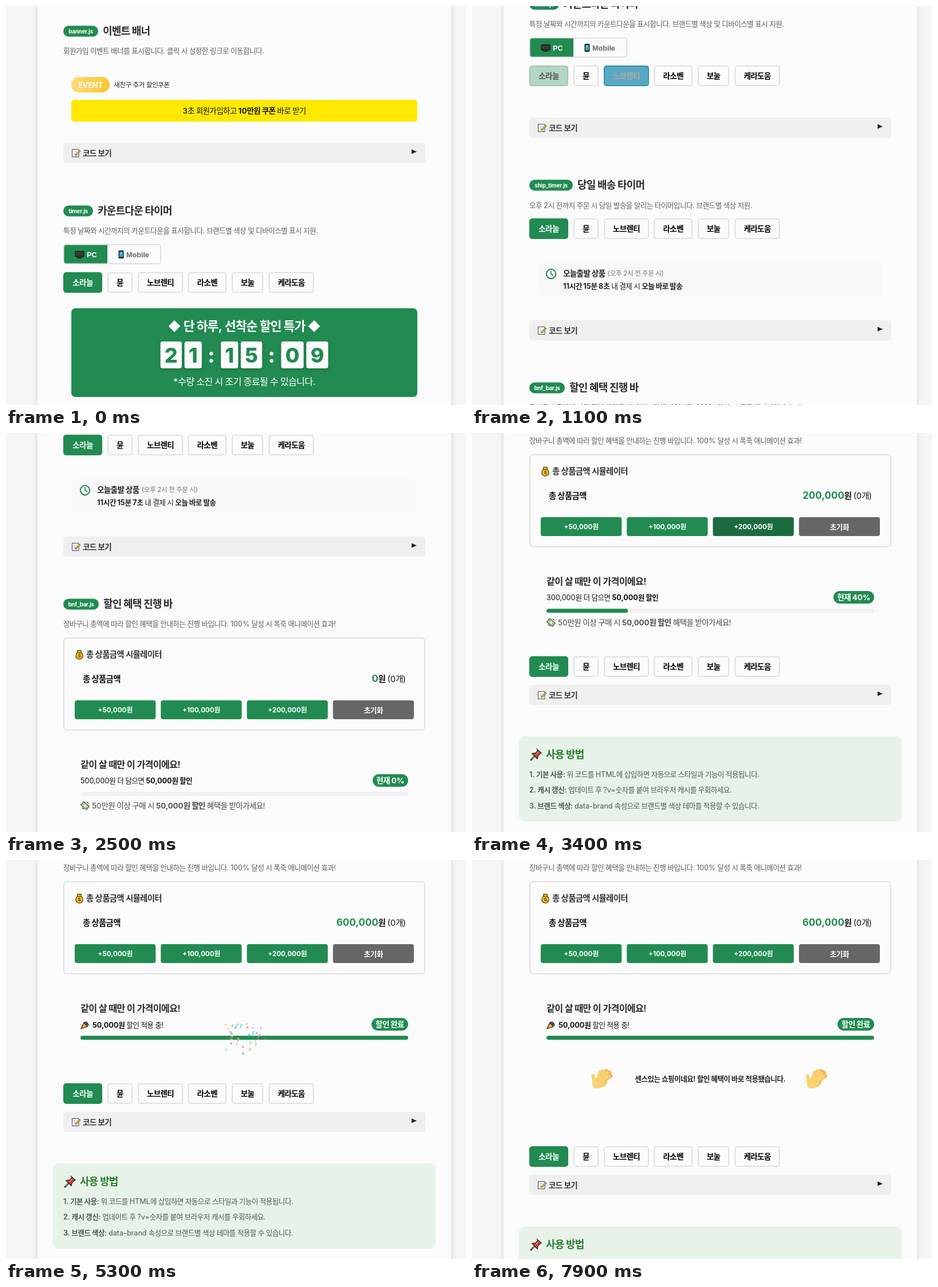
Animation, 803 px wide and 697 px high, one loop 8.1 s. Source, as an HTML page with a canvas:

```html
<!DOCTYPE html>
<html lang="ko">
<head>
<meta charset="utf-8">
<title>위젯 미리보기</title>
<style>
html, body { margin: 0; width: 100%; height: 100%; overflow: hidden; background: #f6f5f5; }
canvas { display: block; }
</style>
</head>
<body>
<canvas id="stage" width="803" height="697"></canvas>
<script>
const ctx = document.getElementById('stage').getContext('2d');
const LOOP = 8100, STEP = 100;
const FONT = 'Inter, "Noto Sans CJK KR", "Noto Sans CJK", sans-serif';
const GREEN = [33, 139, 81], BLUE = [10, 127, 167], PALE = [251, 251, 251];
const LINE = [221, 221, 221], HOVER = [110, 175, 145], BLACK = [0, 0, 0], WHITE = [255, 255, 255];
const BRANDS = [['소라늘', 100, 68], ['뮨', 177, 44], ['노브렌티', 230, 79],
  ['라소벤', 317.5, 67.5], ['보눌', 394, 55], ['케라도움', 458.5, 79]];
const TIMER_H = 155, NOTICE_H = 110, NOTICE_AT = 5500;
const SCROLL = [[200, 0], [300, 120], [400, 290], [500, 361], [2300, 361],
  [2400, 690], [2500, 884], [2700, 884], [2800, 1004], [2900, 1204]];

const rgb = c => `rgb(${c.map(Math.round)})`;
const green = rgb(GREEN);
const clamp = v => Math.min(1, Math.max(0, v));
const mix = (a, b, p) => rgb(a.map((v, i) => v + (b[i] - v) * p));
const between = (t, a, b) => t >= a && t < b;

function track(keys, t) {
  if (t <= keys[0][0]) return keys[0][1];
  for (let i = 1; i < keys.length; i++) {
    const [t0, v0] = keys[i - 1], [t1, v1] = keys[i];
    if (t <= t1) return v0 + (v1 - v0) * (t - t0) / (t1 - t0);
  }
  return keys[keys.length - 1][1];
}

function seeded(seed) {
  return () => (seed = (seed * 16807) % 2147483647) / 2147483647;
}

// ---- drawing helpers ----

function box(x, y, w, h, r, fill, border) {
  ctx.beginPath();
  ctx.roundRect(x, y, w, h, r);
  ctx.fillStyle = border || fill;
  ctx.fill();
  if (!border) return;
  const edge = 1.8;
  ctx.beginPath();
  ctx.roundRect(x + edge, y + edge, w - 2 * edge, h - 2 * edge, Math.max(0, r - edge));
  ctx.fillStyle = fill;
  ctx.fill();
}

function disc(x, y, r, fill) {
  ctx.beginPath();
  ctx.arc(x, y, r, 0, 7);
  ctx.fillStyle = fill;
  ctx.fill();
}

function poly(points, fill, stroke, width = 1) {
  ctx.beginPath();
  points.forEach(([x, y]) => ctx.lineTo(x, y));
  ctx.closePath();
  if (fill) { ctx.fillStyle = fill; ctx.fill(); }
  if (stroke) { ctx.strokeStyle = stroke; ctx.lineWidth = width; ctx.stroke(); }
}

function stroke(x1, y1, x2, y2, color, width) {
  ctx.beginPath();
  ctx.moveTo(x1, y1);
  ctx.lineTo(x2, y2);
  ctx.strokeStyle = color;
  ctx.lineWidth = width;
  ctx.lineCap = 'round';
  ctx.stroke();
}

function at(x, y, draw, turn = 0) {
  ctx.save();
  ctx.translate(x, y);
  ctx.rotate(turn);
  draw();
  ctx.restore();
}

function setFont(weight, size, spacing, family = FONT) {
  ctx.font = `${weight} ${size}px ${family}`;
  ctx.letterSpacing = spacing + 'px';
}

// parts: [string, weight, color, size]; y is the visual middle
function rich(x, y, size, parts, align = 0, latin = 0) {
  const tokens = [];
  let width = 0;
  for (const [str, weight, color, own = size] of parts) {
    for (const s of str.match(/[가-힣 ]+|[^가-힣 ]+/g)) {
      const gap = /[가-힣 ]/.test(s[0]) ? -0.045 * own : latin;
      setFont(weight, own, gap);
      const w = ctx.measureText(s).width;
      tokens.push({ s, weight, color, own, gap, w });
      width += w;
    }
  }
  x -= width * align;
  for (const k of tokens) {
    setFont(k.weight, k.own, k.gap);
    ctx.fillStyle = k.color;
    ctx.fillText(k.s, x, y + size * 0.36);
    x += k.w;
  }
  return width;
}

const text = (str, x, y, size, weight, color, align) =>
  rich(x, y, size, [[str, weight, color]], align);

// ---- small icons ----

const icon = {
  memo() {
    box(-7, -7, 12.5, 14, 1, '#444');
    box(-6, -6, 10.5, 12, 0.5, '#fff');
    for (let y = -3; y < 5; y += 3) stroke(-4, y, 2, y, '#bbb', 1);
    stroke(0, 3, 6.5, -3.5, '#444', 3);
    stroke(0.5, 2.5, 6.2, -3.2, '#f2b33d', 1.8);
  },
  monitor() {
    box(-8, -6, 16, 10.5, 1.5, '#1b1b1b');
    box(-6.5, -4.5, 13, 7, 0.5, '#3a3a3a');
    box(-4, 5, 8, 1.8, 0.5, '#1b1b1b');
  },
  phone() {
    box(-4.5, -7, 9, 14, 1.5, '#222');
    box(-3, -5, 6, 9.5, 0.5, '#2fa4dc');
    box(-1.5, -3, 3, 2, 0, '#8bd3f2');
  },
  bag() {
    disc(0, 2, 6.8, '#3a2a08');
    box(-4, -8, 8, 6, 2, '#3a2a08');
    disc(0, 2, 5.7, '#f5bd1f');
    box(-3, -7, 6, 4, 1.5, '#f5bd1f');
    stroke(-3, -3.5, 3, -3.5, '#7b4d12', 1.4);
    text('$', 0, 2.3, 8, 700, '#6b4a08', 0.5);
  },
  bill() {
    at(0, 0, () => {
      box(-7, -4.5, 14, 9, 1, '#333');
      box(-6, -3.5, 12, 7, 0.5, '#a9c98a');
      disc(0, 0, 2.2, '#eef4dc');
    }, 0.7);
    stroke(-5, 4, -2, 6, '#333', 1.2);
    stroke(3, -6, 6, -4, '#333', 1.2);
  },
  popper() {
    poly([[-7, 6.5], [-2, -4], [4, 3]], '#f6b93b', '#222', 1.3);
    poly([[-2, -5], [3, -6], [7, 0], [4, 3]], '#333');
    stroke(1, -3, 3, -5, '#e8553f', 1.6);
    stroke(4, 0, 6.5, 1.5, '#4a9ee0', 1.6);
    stroke(-5, 4, -2, 5, '#d9772c', 1.2);
  },
  pin() {
    stroke(-2, 2, -9, 9, '#222', 2.6);
    stroke(-3, 3, -8, 8, '#ddd', 1);
    poly([[-7, -2], [-1, -3], [3, -7], [2, -9], [9, -3], [7, -2], [3, 2], [2, 7]], '#e5402b', '#222', 1.4);
    stroke(0, -1, 3, -5, '#f58a73', 1.4);
  },
  clap() {
    const hand = (dx, dy, tone, edge) => at(dx, dy, () => {
      for (const [x, y] of [[0, -12], [6, -13], [11, -10.5], [13, -5]]) {
        stroke(-3, 5, x, y, edge, 7.6);
        stroke(-3, 5, x, y, tone, 6.4);
      }
      ctx.beginPath();
      ctx.ellipse(-3, 5, 12, 9.5, -0.8, 0, 7);
      ctx.fillStyle = tone;
      ctx.fill();
    });
    hand(2.5, 0, '#f2bd58', '#e8ac45');
    hand(-2, 1.5, '#fad272', '#efbd5c');
    stroke(-13, 5, -14.5, -5, '#fad272', 6);
  }
};

function heading(y, file, width, title) {
  box(100, y - 9.5, width, 19, 9.5, green);
  rich(100 + width / 2, y, 9.9, [[file, 700, '#fff']], 0.5, -0.3);
  text(title, 108 + width, y, 18, 700, '#2b2b2b');
}

const desc = (str, y) => text(str, 100, y, 12.6, 400, '#5f5f5f');

function codeRow(y) {
  box(100, y, 632, 35, 5, '#f0efef');
  at(122, y + 18, icon.memo);
  text('코드 보기', 134, y + 18, 13.5, 600, '#333');
  poly([[708, y + 11.5], [717, y + 15.5], [708, y + 19.5]], '#222');
}

// heat: how far each chip is lit; tint: its lit colour
function brandRow(y, heat = [1], tint = [GREEN], hover = -1) {
  BRANDS.forEach(([name, x, w], i) => {
    const p = heat[i] || 0, c = tint[i] || GREEN;
    const rest = i === hover ? HOVER : LINE;
    box(x, y, w, 36, 5, mix(PALE, c, p), mix(rest, c, p));
    text(name, x + w / 2, y + 18, 13.5, 700, mix(BLACK, WHITE, p), 0.5);
  });
}

// ---- sections ----

function bannerSection() {
  heading(44, 'banner.js', 61, '이벤트 배너');
  desc('회원가입 이벤트 배너를 표시합니다. 클릭 시 설정한 링크로 이동합니다.', 78);
  const gold = ctx.createLinearGradient(114, 0, 181, 0);
  gold.addColorStop(0, '#ffd97a');
  gold.addColorStop(1, '#f8c62f');
  box(114, 124, 67, 27, 13.5, gold);
  text('EVENT', 147.5, 138, 12.6, 700, '#fff', 0.5);
  text('새친구 추가 할인쿠폰', 188, 138, 11.7, 400, '#222');
  box(114, 164, 604, 38, 5, '#ffe900');
  rich(416, 183, 13.5, [['3초 회원가입하고 ', 500, '#111'],
    ['10만원 쿠폰', 700, '#111'], [' 바로 받기', 500, '#111']], 0.5);
  codeRow(239);
}

function countdown(color, sec) {
  box(114, 528, 604, 155, 7, rgb(color));
  text('◆ 단 하루, 선착순 할인 특가 ◆', 416, 559, 21.6, 700, '#fff', 0.5);
  const marks = [...`21:15:0${sec}`];
  setFont(800, 36, 0);
  const cells = marks.map(m => m === ':' ? 24 : ctx.measureText(m).width + 14.4);
  const total = cells.reduce((a, b) => a + b + 4.6, -4.6);
  let x = 416 - total / 2;
  marks.forEach((m, i) => {
    const w = cells[i];
    if (m !== ':') {
      ctx.save();
      ctx.shadowColor = 'rgba(0,0,0,.22)';
      ctx.shadowBlur = 5;
      ctx.shadowOffsetY = 2;
      box(x, 586, w, 47, 4, '#fbfbfb');
      ctx.restore();
    }
    text(m, x + w / 2, 610, 36, 800, m === ':' ? '#fff' : rgb(color), 0.5);
    x += w + 4.6;
  });
  text('*수량 소진 시 조기 종료될 수 있습니다.', 416, 656, 16.2, 400, '#fff', 0.5);
}

function timerSection(t, shown, sec) {
  heading(358, 'timer.js', 52, '카운트다운 타이머');
  desc('특정 날짜와 시간까지의 카운트다운을 표시합니다. 브랜드별 색상 및 디바이스별 표시 지원.', 392);
  box(100, 416, 171, 35, 5, '#fbfbfb', rgb(LINE));
  box(101.5, 417.5, 75.5, 32, [4, 0, 0, 4], green);
  at(128.5, 434, icon.monitor);
  at(201, 434, icon.phone);
  setFont(700, 12.6, 0, '"Liberation Sans", Arial, sans-serif');
  ctx.fillStyle = '#fff';
  ctx.fillText('PC', 141, 438.5);
  ctx.fillStyle = '#666';
  ctx.fillText('Mobile', 210, 438.5);

  const lit = clamp((t - 900) / 300) - clamp((t - 1700) / 300);
  brandRow(465, [1 - lit, 0, lit], [GREEN, GREEN, BLUE], between(t, 900, 1800) ? 2 : -1);
  if (shown) countdown(between(t, 1000, 1800) ? BLUE : GREEN, sec);
  codeRow(556 + (shown ? TIMER_H : 0));
}

function shipSection(sec) {
  heading(313, 'ship_timer.js', 76, '당일 배송 타이머');
  desc('오후 2시 전까지 주문 시 당일 발송을 알리는 타이머입니다. 브랜드별 색상 지원.', 348);
  brandRow(371);
  box(114, 448.5, 603, 58, 5, '#f9f7f8');
  ctx.beginPath();
  ctx.arc(138, 468, 8.2, 0, 7);
  ctx.strokeStyle = green;
  ctx.lineWidth = 2;
  ctx.stroke();
  stroke(138, 463, 138, 468, green, 1.6);
  stroke(138, 468, 141.5, 470.5, green, 1.6);
  const w = text('오늘출발 상품', 159, 467, 13.5, 700, '#222');
  text('(오후 2시 전 주문 시)', 163 + w, 467, 11.7, 400, '#777');
  rich(159, 489, 12.6, [[`11시간 15분 ${sec}초`, 700, '#222'],
    [' 내 결제 시 ', 400, '#222'], ['오늘 바로 발송', 700, '#222']]);
  codeRow(549);
}

function barFill(t) {
  let fill = 0;
  for (const [start, goal] of [[3317, 0.4], [3717, 0.8], [4017, 1]]) {
    const u = clamp((t - start) / 300);
    fill += (goal - fill) * (1 - (1 - u) ** 3);
  }
  return fill;
}

function benefitSection(t) {
  const total = t < 3400 ? 0 : t < 3800 ? 200000 : t < 4100 ? 400000 : 600000;
  const done = total >= 500000, num = n => n.toLocaleString('en-US');
  heading(-21, 'bnf_bar.js', 62, '할인 혜택 진행 바');
  desc('장바구니 총액에 따라 할인 혜택을 안내하는 진행 바입니다. 100% 달성 시 폭죽 애니메이션 효과!', 13.5);

  box(100, 37, 632, 162.5, 7, '#fbfbfb', rgb(LINE));
  at(128, 67, icon.bag);
  text('총 상품금액 시뮬레이터', 140, 67, 14.4, 600, '#333');
  text('총 상품금액', 134, 110, 14.4, 700, '#111');
  rich(698, 110, 14.4, [[num(total), 700, green, 17], ['원', 700, '#111'], [' (0개)', 400, '#111']], 1);
  const pressed = between(t, 3200, 4300), gap = 9, w = (592 - 3 * gap) / 4;
  ['+50,000원', '+100,000원', '+200,000원', '초기화'].forEach((label, i) => {
    const x = 120 + i * (w + gap);
    box(x, 147, w, 33, 4, i === 3 ? '#666' : i === 2 && pressed ? '#1b6b3f' : green);
    text(label, x + w / 2, 164, i === 3 ? 12.6 : 11.7, 700, '#fff', 0.5);
  });

  text('같이 살 때만 이 가격이에요!', 130, 259, 16.2, 600, '#2b2b2b');
  if (done) {
    at(138, 288, icon.popper);
    rich(151, 288, 12.6, [['50,000원', 700, '#111'], [' 할인 적용 중!', 400, '#111']]);
  } else {
    rich(130, 287, 12.6, [[`${num(500000 - total)}원 더 담으면 `, 400, '#111'], ['50,000원 할인', 700, '#111']]);
    at(138, 331, icon.bill);
    rich(150, 331, 13.5, [['50만원 이상 구매 시 ', 400, '#444'],
      ['50,000원 할인', 600, '#444'], [' 혜택을 받아가세요!', 400, '#444']]);
  }
  const state = done ? '할인 완료' : `현재 ${total / 5000}%`;
  const pill = done ? 64 : total ? 71 : 62;
  box(702 - pill, 276, pill, 22, 11, green);
  text(state, 702 - pill / 2, 287, 13.5, 700, '#fff', 0.5);
  box(130, 307, 572, 7, 3.5, '#f3eeef');
  const fill = barFill(t);
  if (fill) box(130, 307, 572 * fill, 7, 3.5, green);

  const notice = t >= NOTICE_AT;
  if (notice) {
    text('센스있는 쇼핑이네요! 할인 혜택이 바로 적용됐습니다.', 416, 382, 12.6, 700, '#222', 0.5);
    [226, 600.5].forEach(x => applause(x, t));
  }
  at(0, notice ? NOTICE_H : 0, guide);
}

function applause(x, t) {
  at(x, 382, icon.clap);
  const phase = (t - 7000 + 9000) % 900;
  if (phase < 200) return;
  const u = (phase - 200) / 700, out = 22 + 18 * (1 - (1 - u) ** 2);
  ctx.globalAlpha = 1 - u ** 3;
  disc(x - out, 375.5, 2.1, '#5aa9ee');
  disc(x - out - 1, 384, 1.2, '#7cc0f5');
  disc(x + out + 2, 378, 2.1, '#5aa9ee');
  disc(x + out - 4, 387, 1.5, '#7cc0f5');
  ctx.globalAlpha = 1;
}

function guide() {
  brandRow(390);
  codeRow(440);
  box(82, 530, 668, 149, 9, '#e7f3e8');
  at(112, 562, icon.pin);
  text('사용 방법', 129, 562, 18, 700, '#2e7d32');
  [['1. 기본 사용:', ' 위 코드를 HTML에 삽입하면 자동으로 스타일과 기능이 적용됩니다.'],
    ['2. 캐시 갱신:', ' 업데이트 후 ?v=숫자를 붙여 브라우저 캐시를 우회하세요.'],
    ['3. 브랜드 색상:', ' data-brand 속성으로 브랜드별 색상 테마를 적용할 수 있습니다.']]
    .forEach(([label, rest], i) =>
      rich(100, 596 + i * 27.5, 12.6, [[label, 600, '#555'], [rest, 400, '#555']]));
}

function burst(t, start, reach, seed) {
  const rand = seeded(seed), colors = ['#ff6b6b', '#5cc4ff', '#ffc93c', '#7edc9a', '#cf9bff', '#6fe3e1'];
  for (let i = 0; i < 45; i++) {
    const angle = rand() * Math.PI * 2, far = reach * (0.3 + 0.7 * rand());
    const life = 600 + 650 * rand() ** 2, spin = rand() * 6;
    const u = (t - start) / life;
    if (u <= 0 || u >= 1) continue;
    const go = 1 - (1 - u) ** 2, s = 2.2 + 3 * u;
    ctx.globalAlpha = 0.7 * (1 - u ** 3);
    at(412 + Math.cos(angle) * far * go, 305 + Math.sin(angle) * far * go * 0.85 + 30 * u * u, () =>
      poly([[-s, 0], [0, -s * 0.8], [s, 0], [0, s * 0.8]], colors[i % colors.length]), spin + u * 3);
  }
  ctx.globalAlpha = 1;
}

function confetti(t) {
  ctx.save();
  ctx.beginPath();
  ctx.rect(124, 236, 592, t < NOTICE_AT ? 119 : 228);
  ctx.clip();
  burst(t, 4050, 100, 71);
  burst(t, 5210, 165, 4242);
  ctx.restore();
}

function backdrop() {
  ctx.fillStyle = '#f6f5f5';
  ctx.fillRect(0, 0, 803, 697);
  ctx.save();
  ctx.shadowColor = 'rgba(0,0,0,.13)';
  ctx.shadowBlur = 9;
  ctx.fillStyle = '#fbfbfb';
  ctx.fillRect(55, -30, 722, 757);
  ctx.restore();
}

function draw(t) {
  const scroll = track(SCROLL, t);
  const shown = !between(t, 1000, 1400) && !between(t, 1800, 2200);
  const sec = t < 900 ? 9 : t < 1900 ? 8 : 7;
  const shipY = 361 + (shown ? TIMER_H : 0) - scroll;
  backdrop();
  at(0, -scroll, () => { bannerSection(); timerSection(t, shown, sec); });
  at(0, shipY, () => shipSection(sec));
  at(0, shipY + 688, () => benefitSection(t));
  confetti(t);
}

const origin = performance.now();
function frame() {
  const t = (performance.now() - origin) % LOOP;
  draw(Math.floor(t / STEP) * STEP);
  requestAnimationFrame(frame);
}
frame();
</script>
</body>
</html>
```
